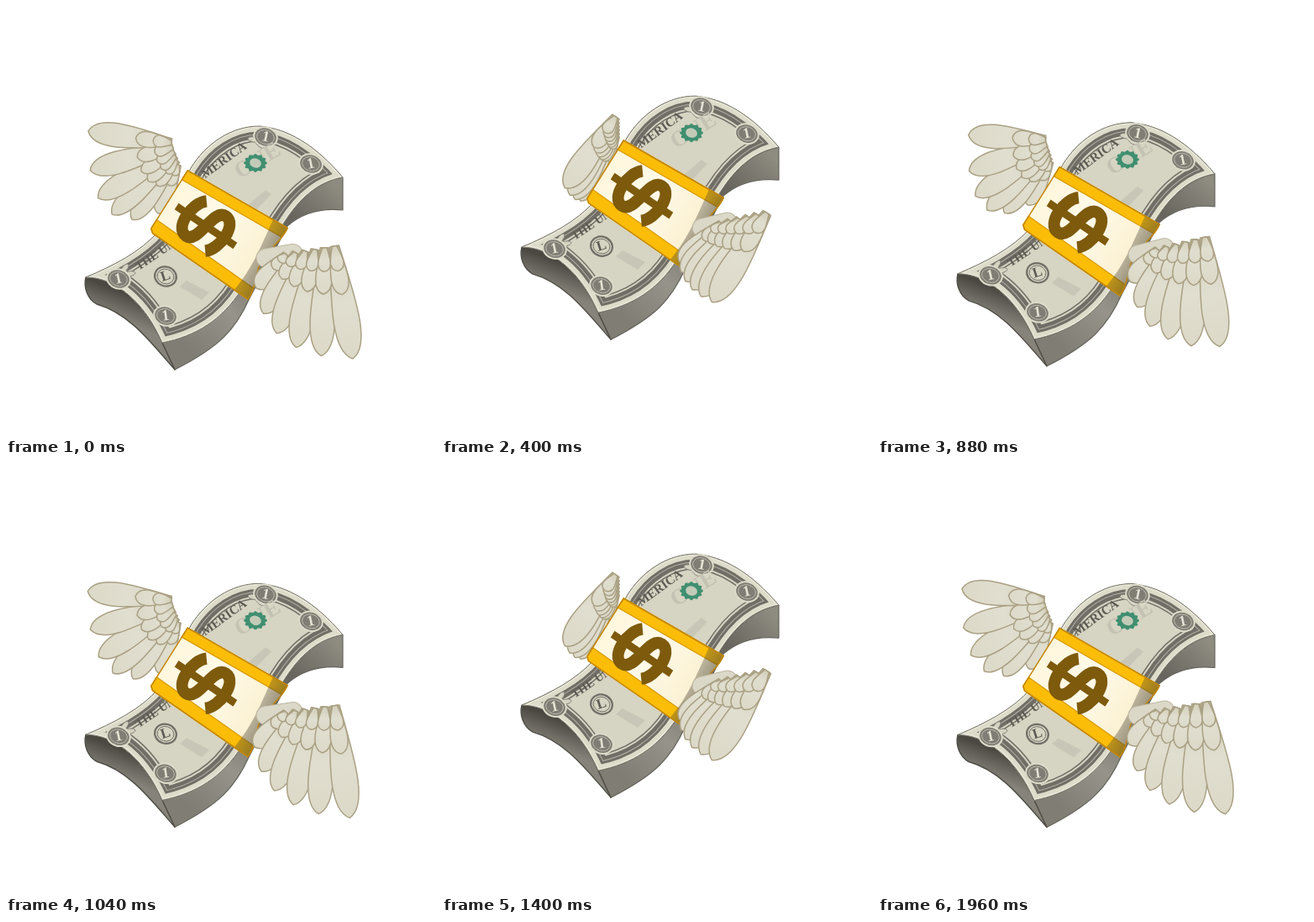
Write an HTML page with a canvas that moves like this. It is 512 px wide and 512 px high and loops after 2000 ms.

```html
<!DOCTYPE html>
<html lang="en">
<head>
<meta charset="utf-8">
<title>Flying money</title>
<style>
html, body { margin: 0; width: 100%; height: 100%; overflow: hidden; background: #fff; }
canvas { display: block; width: 100vw; height: 100vh; }
</style>
</head>
<body>
<canvas id="stage" width="512" height="512"></canvas>
<script>
const ctx = document.getElementById('stage').getContext('2d');
const FLAP = 1000, STEP = 40, RISE = 450, HEIGHT = 37, FEATHERS = 6;
const SERIF = '"Liberation Serif", "Noto Serif", serif';
const INK = '#706e66', PAPER = '#d6d4c2', PALE = '#dddbc9', EDGE = '#aaa184';

// Each joint: lowered place, folded place, and its lag behind the stroke
const LEFT = {
  root: [208, 200], half: 14.5, stub: false,
  wrist: [[197, 163], [208, 168], [-2, 0]],
  first: [[98, 149], [150, 254], [-6, 5]],
  middle: [[117, 240], [163, 267], [0, 4]],
  last: [[181, 247], [178, 258], [4, 11]]
};
const RIGHT = {
  root: [309, 300], half: 16, stub: true,
  wrist: [[391, 286], [386, 279], [2, 9]],
  first: [[413, 420], [321, 384], [-7, 10]],
  middle: [[333, 399], [295, 367], [-8, 2]],
  last: [[298, 336], [284, 338], [-6, 6]]
};

// Half a turn going up, half a turn coming down
function phase(t) {
  return Math.PI * (t < RISE ? t / RISE : 1 + (t - RISE) / (FLAP - RISE));
}

const mix = (a, b, f) => [a[0] + (b[0] - a[0]) * f, a[1] + (b[1] - a[1]) * f];

function joint([low, high, lag], angle) {
  const p = mix(low, high, (1 - Math.cos(angle)) / 2), s = Math.sin(angle);
  return [p[0] + lag[0] * s, p[1] + lag[1] * s];
}

// Quadratic curve through a, m (halfway) and b
function arc(a, m, b, f) {
  const c = [0, 1].map(k => 2 * m[k] - (a[k] + b[k]) / 2);
  return mix(mix(a, c, f), mix(c, b, f), f);
}

function ramp(x0, y0, x1, y1, ...colors) {
  const g = ctx.createLinearGradient(x0, y0, x1, y1);
  colors.forEach((c, i) => g.addColorStop(i / (colors.length - 1), c));
  return g;
}

function fill(d, style) {
  ctx.fillStyle = style;
  ctx.fill(new Path2D(d));
}

function line(d, style, width) {
  ctx.strokeStyle = style;
  ctx.lineWidth = width;
  ctx.stroke(new Path2D(d));
}

function clipped(d, paint) {
  ctx.save();
  ctx.clip(new Path2D(d));
  paint();
  ctx.restore();
}

function label(text, x, y, angle, size, color, align = 'center') {
  ctx.save();
  ctx.translate(x, y);
  ctx.rotate(angle * Math.PI / 180);
  ctx.font = `bold ${size}px ${SERIF}`;
  ctx.fillStyle = color;
  ctx.textAlign = align;
  ctx.textBaseline = 'middle';
  ctx.fillText(text, 0, 0);
  ctx.restore();
}

function oval(x, y, rx, ry, color, width, tilt = 0.3) {
  ctx.beginPath();
  ctx.ellipse(x, y, rx, ry, tilt, 0, 7);
  ctx[width ? 'strokeStyle' : 'fillStyle'] = color;
  if (width) {
    ctx.lineWidth = width;
    ctx.stroke();
  } else ctx.fill();
}

function feather(base, tip, half) {
  const dx = tip[0] - base[0], dy = tip[1] - base[1], len = Math.hypot(dx, dy) || 1;
  const at = (f, w) => [base[0] + dx * f - dy / len * w, base[1] + dy * f + dx / len * w];
  ctx.beginPath();
  ctx.moveTo(...at(0, half * 0.35));
  ctx.bezierCurveTo(...at(0.4, half * 0.8), ...at(0.9, half * 1.65), ...tip);
  ctx.bezierCurveTo(...at(0.9, -half * 1.65), ...at(0.4, -half * 0.8), ...at(0, -half * 0.35));
  ctx.closePath();
  ctx.fillStyle = ramp(...base, ...tip, '#d3cfbb', '#e0decf', '#dcd9c8');
  ctx.fill();
  ctx.strokeStyle = EDGE;
  ctx.lineWidth = 1.5;
  ctx.stroke();
}

function wing({ root, half, stub, ...joints }, angle) {
  const at = name => joint(joints[name], angle);
  const wrist = at('wrist'), first = at('first'), middle = at('middle'), last = at('last');
  if (stub) {
    const arm = `M${root}L${mix(root, wrist, 0.4)}`;
    ctx.lineCap = 'round';
    line(arm, '#bdb69f', 23);
    line(arm, '#dbd8c8', 21);
    ctx.lineCap = 'butt';
  }
  // Long feathers first, then two rows of shorter ones over them
  for (const [reach, width] of [[1, 1], [0.43, 0.66], [0.22, 0.5]]) {
    for (let i = FEATHERS - 1; i >= 0; i--) {
      const f = i / (FEATHERS - 1);
      const base = mix(wrist, root, f * 0.7);
      const tip = arc(first, middle, last, f);
      feather(base, mix(base, tip, reach), half * width * (1 - 0.25 * f));
    }
  }
}

function medal(x, y, angle) {
  oval(x, y, 15, 12.5, PALE);
  oval(x, y, 13, 10.5, '#7f7d74');
  oval(x, y, 10.5, 8.3, '#bfbdae', 1);
  label('1', x, y + 0.5, angle, 18, '#e5e3d3');
}

function seal(x, y) {
  ctx.beginPath();
  for (let i = 0; i <= 96; i++) {
    const a = i / 96 * Math.PI * 2, r = 12 + Math.cos(a * 12);
    ctx.lineTo(x + r * 1.08 * Math.cos(a), y + r * 0.85 * Math.sin(a));
  }
  ctx.fillStyle = '#3f8f70';
  ctx.fill();
  oval(x, y, 7, 5.6, '#c3cbb8');
}

const FACE = 'M95 323C128 309 160 293 182 268L220 193C238 164 268 143 302 143'
  + 'C335 146 368 165 401 204C372 209 350 228 331 258L280 338C257 374 226 393 186 401C165 352 130 323 95 323Z';
const SIDE = 'M401 204L401 243C371 240 351 248 335 262L290 348C273 386 254 406 201 433'
  + 'L186 401C226 393 257 374 280 338L331 258C350 228 372 209 401 204Z';
const END = 'M95 323C92 335 97 349 108 355C147 366 172 400 201 433L186 401C165 352 130 323 95 323Z';
const BAND = 'M216 195L336 264C327 284 307 294 301 313C297 330 295 342 288 350L174 271L172 265Z';
const STRIPES = 'M204 188L348 271M158 256L302 358';
const DOLLAR = 'M25 -15C14 -29 -23 -31 -23 -14C-23 4 23 -4 23 14C23 31 -14 29 -25 15';

function bill() {
  fill(SIDE, ramp(220, 410, 400, 220, '#807e74', '#96948a', '#77756b', '#66645c', '#8e8c81'));
  line(SIDE, '#66645c', 1.2);
  fill(END, ramp(150, 345, 138, 376, '#4a4841', '#69675f', '#86837a'));
  line(END, '#4f4d45', 1.4);
  fill(FACE, PAPER);
  clipped(FACE, () => {
    // Nested outlines leave a printed frame inside the edge
    [[INK, 37], [PAPER, 34], [INK, 30], ['#b3b1a3', 21], [INK, 19], [PALE, 13], ['#e9e7d8', 4]]
      .forEach(([color, width]) => line(FACE, color, width));
  });
  line(FACE, '#77756a', 1);

  for (const [x, y, tilt] of [[295, 159, 0.2], [302, 164, 0.8], [141, 313, -0.9], [147, 319, -0.2]]) {
    oval(x, y, 7, 3, '#d4d2c0', 0, tilt);
    oval(x, y, 7, 3, '#85837a', 1, tilt);
  }
  medal(309, 156, 12);
  medal(363, 188, -12);
  medal(134, 325, -12);
  medal(190, 369, -8);

  label('MERICA', 260, 184, -36, 15, '#5b5a53');
  label('THE UNI', 156, 312, -34, 14, '#5b5a53', 'left');
  label('ONE', 300, 185, -31, 27, '#c3c2b3');
  seal(297, 187);
  fill('M286 239L309 219L316 224L294 247Z', '#c8c7b7');
  fill('M207 334L215 327L242 341L233 350Z', '#c8c7b7');
  oval(190, 322, 13, 11.5, INK, 2.2);
  oval(190, 322, 10, 8.7, INK, 1);
  label('L', 190, 322, -18, 17, '#5b5a53');
}

function band() {
  clipped(BAND, () => {
    fill(BAND, ramp(195, 225, 300, 300, '#fff6dc', '#fffae8', '#fbf1d3'));
    line(STRIPES, '#d99a00', 28.5);
    line(STRIPES, '#fbbd08', 26);
    fill('M318 254L345 266L292 360L270 340C292 315 302 290 318 254Z',
      ramp(290, 296, 318, 312, 'rgba(78,72,58,.3)', 'rgba(70,64,50,.62)'));
    line(BAND, '#c08408', 3);
  });
  ctx.save();
  ctx.transform(0.53, -0.85, 0.83, 0.56, 238, 262);
  line(DOLLAR, '#7d5a0c', 14);
  line('M0 -42V42', '#7d5a0c', 9);
  ctx.restore();
}

function draw(now) {
  const angle = phase(Math.floor(now / STEP) * STEP % FLAP);
  ctx.setTransform(1, 0, 0, 1, 0, 0);
  ctx.fillStyle = '#fff';
  ctx.fillRect(0, 0, 512, 512);
  ctx.translate(0, -HEIGHT * (1 - Math.cos(angle)) / 2);
  ctx.lineJoin = 'round';
  wing(LEFT, angle);
  bill();
  band();
  wing(RIGHT, angle);
}

const start = performance.now();
function tick() {
  draw(performance.now() - start);
  requestAnimationFrame(tick);
}
tick();
</script>
</body>
</html>
```
